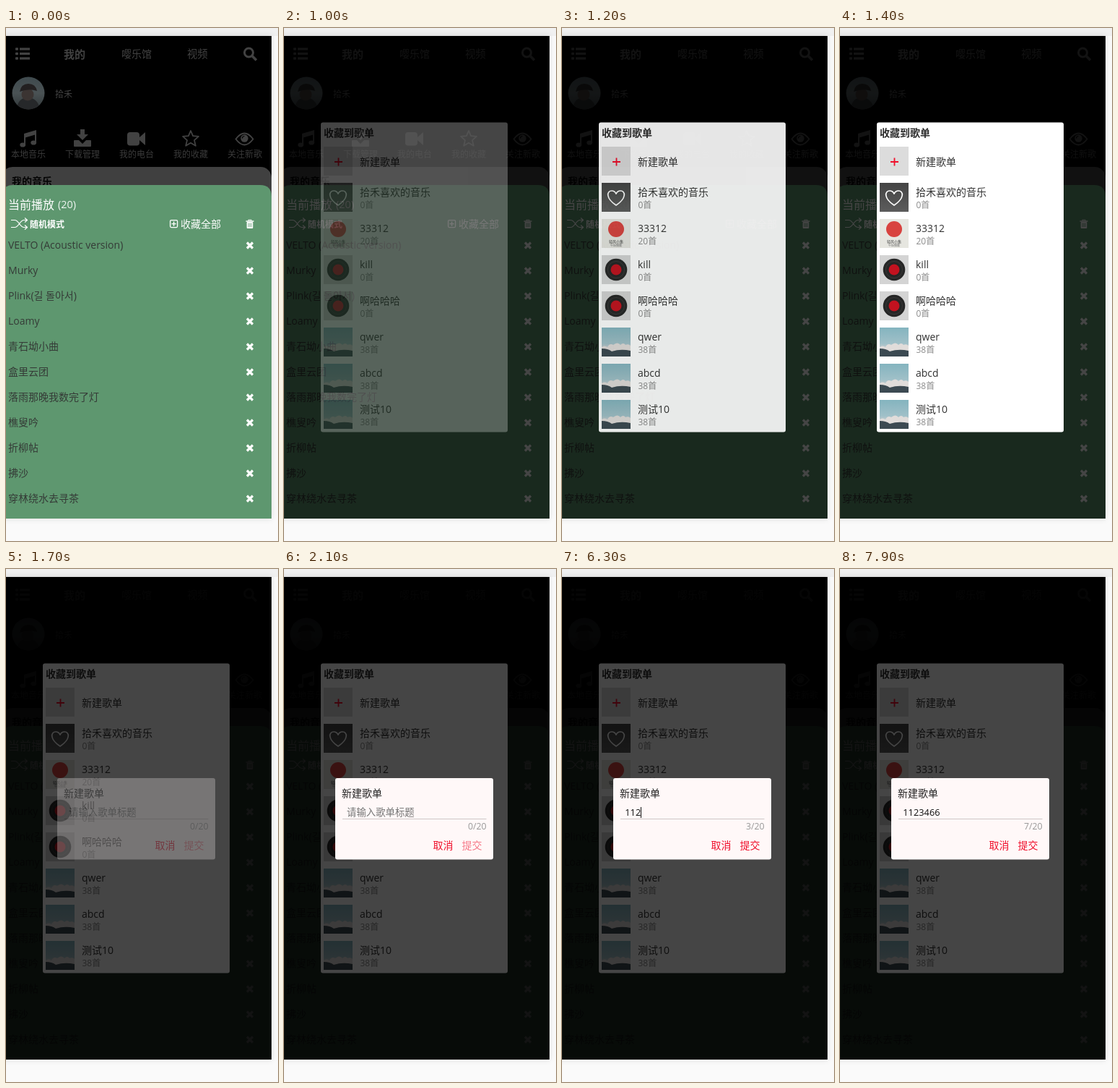
Recreate the animation shown at these times as an HTML page. Size 377x709 px, loop 8000 ms.

```html
<!DOCTYPE html>
<html lang="zh">
<head>
<meta charset="utf-8">
<title>Music player</title>
<style>
html, body { margin: 0; width: 100%; height: 100%; overflow: hidden; background: #fafafa; }
svg { display: block; width: 377px; height: 709px; }
text { font-family: "Open Sans", "Noto Sans CJK SC", "Noto Sans CJK KR", "Noto Sans CJK", sans-serif; white-space: pre; }
.phone { filter: drop-shadow(0 0 4px rgba(0, 0, 0, .12)); }
</style>
</head>
<body>
<svg id="stage" viewBox="0 0 377 709" xmlns="http://www.w3.org/2000/svg"></svg>
<script>
const LOOP = 8000;
const GREEN = '#5e976f', RED = '#f0102c', DIM = '#424242';

const SONGS = ['VELTO (Acoustic version)', 'Murky', 'Plink(길 돌아서)', 'Loamy', '青石坳小曲',
  '盒里云团', '落雨那晚我数完了灯', '樵叟吟', '折柳帖', '拂沙', '穿林绕水去寻茶'];
const LISTS = [['拾禾喜欢的音乐', 0, 'heart'], ['33312', 20, 'cover'], ['kill', 0, 'record'],
  ['啊哈哈哈', 0, 'record'], ['qwer', 38, 'sky'], ['abcd', 38, 'sky'], ['测试10', 38, 'sky']];

// Opacity of a dialog in 100 ms steps from the moment it opens
const FADE = [.27, .62, .9, .97, 1];
const OPEN_LIST = 1000, OPEN_FORM = 1700;
const TYPED = '1123466';
const KEYS = [6000, 6100, 6300, 6700, 6900, 7200, 7400];

// --- Drawing helpers ---
// Text is placed by its vertical middle
const text = (x, mid, size, str, fill, attrs = '') =>
  `<text x="${x}" y="${mid + size * .37}" font-size="${size}" fill="${fill}" ${attrs}>${str}</text>`;
const rect = (x, y, w, h, fill, r = 0) =>
  `<rect x="${x}" y="${y}" width="${w}" height="${h}" rx="${r}" fill="${fill}"/>`;
const circle = (x, y, r, fill) => `<circle cx="${x}" cy="${y}" r="${r}" fill="${fill}"/>`;
const shape = (d, fill) => `<path d="${d}" fill="${fill}"/>`;
const line = (d, color, width = 1.5) =>
  `<path d="${d}" fill="none" stroke="${color}" stroke-width="${width}" stroke-linejoin="round"/>`;
const group = (id, body) => `<g id="${id}">${body}</g>`;
const shade = id => group(id, rect(0, 11, 368, 667, 'rgba(0,0,0,.73)'));
const bold = 'font-weight="700"', medium = 'font-weight="500"', middle = 'text-anchor="middle"';

function star(cx, cy, r) {
  let d = '';
  for (let i = 0; i < 10; i++) {
    const a = Math.PI * (i / 5 - .5), q = i % 2 ? r * .46 : r;
    d += `${i ? 'L' : 'M'}${(cx + q * Math.cos(a)).toFixed(1)} ${(cy + q * Math.sin(a)).toFixed(1)}`;
  }
  return d + 'Z';
}

const cross = (x, y) => line(`M${x - 4} ${y - 4}l8 8m0 -8l-8 8`, '#fff', 3.2);

// --- Page behind everything ---
function header() {
  let s = '';
  for (const y of [29, 35.5, 42]) s += rect(13, y - 1.7, 4, 3.4, DIM, 1) + rect(19, y - 1.6, 14, 3.2, DIM);
  s += text(80, 36, 15, '我的', DIM, bold);
  s += text(160, 36, 14, '嘤乐馆', DIM) + text(251, 36, 14.3, '视频', DIM);
  s += `<circle cx="336.5" cy="34" r="6" fill="none" stroke="${DIM}" stroke-width="3"/>`;
  s += line('M341 38.5l6 6', DIM, 3.6);
  return s;
}

function avatar() {
  return `<g clip-path="url(#round)">${rect(8, 67, 46, 46, 'url(#portrait)')}
    ${shape('M15 114c0-13 7-18 15-18s16 5 17 18Z', '#26282a')}
    ${circle(30, 92, 8.5, '#3b3432')}
    ${shape('M19 88q2-11 12-11t12 10q-11-4-24 1Z', '#232021')}</g>`;
}

function shortcuts() {
  const names = ['本地音乐', '下载管理', '我的电台', '我的收藏', '关注新歌'];
  let s = names.map((n, i) => text(31 + 75 * i, 174.5, 12, n, '#3a3a3a', middle)).join('');
  s += shape('M25 146l17-5v6l-17 5Z', DIM) + line('M26 146v15M41 142v16', DIM, 2);
  s += `<ellipse cx="23.2" cy="161.5" rx="3.9" ry="3.1" fill="${DIM}"/>`;
  s += `<ellipse cx="38.2" cy="158.5" rx="3.9" ry="3.1" fill="${DIM}"/>`;
  s += shape('M103 140h6v7h5l-8 8l-8-8h5Z', DIM);
  s += shape('M95 155h6l5 5l5-5h6q1 0 1 1v7q0 1-1 1h-22q-1 0-1-1v-7q0-1 1-1Z', DIM);
  s += rect(168, 144, 17, 18.5, DIM, 4) + shape('M185 151l8-7v18l-8-7Z', DIM);
  s += line(star(256, 153.5, 11.5), DIM, 1.8);
  s += line('M318.5 153.5q12-16 24 0q-12 16-24 0Z', DIM, 1.9);
  s += circle(330.5, 152.5, 5.2, DIM) + line('M327.5 152.5q0-3 3-3', '#000', 1.2);
  return s;
}

function queue() {
  let s = rect(-6, 192, 374, 60, '#404040', 15) + text(8, 212, 14, '我的音乐', '#050505', bold);
  s += shape('M-6 678V233q0-16 16-16H352q16 0 16 16V678Z', GREEN);
  s += text(3, 244, 16, '当前播放', '#fff', medium) + text(72, 244, 14.4, '(20)', '#eef5f0');
  s += line('M7 265.5h5c6 0 7 10 13 10h4M7 275.5h5c6 0 7-10 13-10h4M26 262.5l3.5 3l-3.5 3M26 272.5l3.5 3l-3.5 3', '#fff', 1.2);
  s += text(33, 271.5, 12, '随机模式', '#fff', bold);
  s += `<rect x="227.6" y="265.6" width="10" height="10" rx="1.5" fill="none" stroke="#fff" stroke-width="1.3"/>`;
  s += line('M229.5 270.6h6.2M232.6 267.5v6.2', '#fff', 1.4);
  s += text(242, 271, 14, '收藏全部', '#fff', medium);
  s += rect(332.5, 266.3, 11, 1.5, '#fff') + line('M336 266.5v-1.3h4v1.3', '#fff', 1.1);
  s += rect(333.7, 268, 8.6, 9, '#fff', 1) + line('M336 269.5v5.5M338 269.5v5.5M340 269.5v5.5', GREEN, .8);
  SONGS.forEach((name, i) => {
    const y = 300 + 35 * i;
    s += text(3, y, 14, name, '#353b37') + cross(338, y + .5);
  });
  return s;
}

// --- Playlist dialog ---
const covers = {
  heart: y => rect(55, y, 40, 40, 'url(#slate)') +
    line(`M75 ${y + 31}C60 ${y + 21} 62 ${y + 11} 69 ${y + 11}Q73 ${y + 11} 75 ${y + 15}Q77 ${y + 11} 81 ${y + 11}C88 ${y + 11} 90 ${y + 21} 75 ${y + 31}Z`, '#fff', 1.7),
  cover: y => rect(55, y, 40, 40, '#e6e6e0') + circle(75, y + 14, 11, '#d8433f') +
    text(75, y + 31, 5, '轻风小集', '#444', middle) + text(75, y + 36.5, 4, '午后慢歌', '#666', middle),
  record: y => rect(55, y, 40, 40, '#d4d4d4') + circle(75, y + 20, 15.3, '#262626') +
    `<circle cx="75" cy="${y + 20}" r="11.5" fill="none" stroke="#3a3a3a"/>` + circle(75, y + 20, 7.5, '#c2121f'),
  sky: y => rect(55, y, 40, 40, 'url(#sky)') +
    shape(`M55 ${y + 27}q4-3 8 0q3-6 8-3q6-5 10 0q4-4 7 0q4-2 7 1v10H55Z`, '#e0dcda') +
    shape(`M55 ${y + 29}q9 0 14 4q12-4 26-1v8H55Z`, '#3c4a52')
};

function listDialog() {
  let s = rect(51, 130.5, 259, 428, '#fff', 3) + text(55, 144.5, 14, '收藏到歌单', '#2c2c2c', bold);
  s += rect(55, 164, 40, 40, '#dcdcdc') + line('M70 185h11M75.5 179.5v11', RED, 1.8);
  s += text(105, 185, 14, '新建歌单', '#333', medium);
  LISTS.forEach(([name, count, cover], i) => {
    const y = 214 + 50 * i;
    s += covers[cover](y) + text(105, y + 13, 14, name, '#333') + text(105.5, y + 30.5, 12, count + '首', '#8c8c8c');
  });
  return s;
}

// --- New playlist form ---
function formDialog() {
  return rect(71, 289, 219, 112.5, '#fff8f8', 3) +
    text(80, 309.5, 14, '新建歌单', '#222', medium) +
    text(87, 336, 13.4, '请输入歌单标题', '#757575', 'id="hint"') +
    text(87.3, 336.5, 12.8, '', '#111', 'id="value"') +
    rect(87, 329, 1, 15, '#111').replace('<rect', '<rect id="caret"') +
    rect(81, 345, 199.5, 1, '#cfc8c8') +
    text(280.5, 355, 12.3, '0/20', '#999', 'id="count" text-anchor="end"') +
    text(206.5, 382, 14, '取消', RED) + text(246.5, 382, 14, '提交', RED, 'id="submit"');
}

const gradient = (id, stops) => `<linearGradient id="${id}" x2="0" y2="1">` +
  stops.map(([at, c]) => `<stop offset="${at}" stop-color="${c}"/>`).join('') + '</linearGradient>';

document.getElementById('stage').innerHTML = `<defs>
  <clipPath id="screen"><rect y="11" width="368" height="667"/></clipPath>
  <clipPath id="round"><circle cx="31" cy="90" r="22.5"/></clipPath>
  ${gradient('portrait', [[0, '#3f4a4e'], [.5, '#4a5254'], [1, '#303638']])}
  ${gradient('slate', [[0, '#444'], [1, '#5c5c5c']])}
  ${gradient('sky', [[0, '#84b4bf'], [.55, '#a0c0c8'], [.8, '#d5d2d2']])}
</defs>` +
  rect(0, 0, 377, 709, '#fafafa') + rect(0, 0, 377, 11, '#f1f1f1') +
  `<g class="phone">${rect(-10, 11, 378, 667, '#000')}</g><g clip-path="url(#screen)">` +
  header() + text(68, 91.5, 12, '拾禾', DIM) + avatar() + shortcuts() + queue() +
  shade('shade1') + group('list', listDialog()) +
  shade('shade2') + group('form', formDialog()) + '</g>';

// --- Animation ---
const el = Object.fromEntries(['shade1', 'list', 'shade2', 'form', 'hint', 'value', 'caret', 'count', 'submit']
  .map(id => [id, document.getElementById(id)]));

function fade(t, start) {
  if (t < start) return 0;
  return FADE[Math.min(FADE.length - 1, Math.floor((t - start) / 100))];
}

function draw(t) {
  el.shade1.style.opacity = +(t >= OPEN_LIST);
  el.list.style.opacity = fade(t, OPEN_LIST);
  el.shade2.style.opacity = +(t >= OPEN_FORM);
  el.form.style.opacity = fade(t, OPEN_FORM);

  const n = KEYS.filter(k => t >= k).length;
  const caretOn = (t >= 5100 && t < 5600) || (n > 0 && t < KEYS[n - 1] + 500);
  el.hint.style.opacity = +!n;
  el.value.textContent = TYPED.slice(0, n);
  el.count.textContent = n + '/20';
  el.submit.style.opacity = n ? 1 : .55;
  el.caret.style.opacity = +caretOn;
  el.caret.setAttribute('x', Math.round(87 + 7.27 * n));
}

function tick() {
  draw(performance.now() % LOOP);
  requestAnimationFrame(tick);
}
tick();
</script>
</body>
</html>
```
